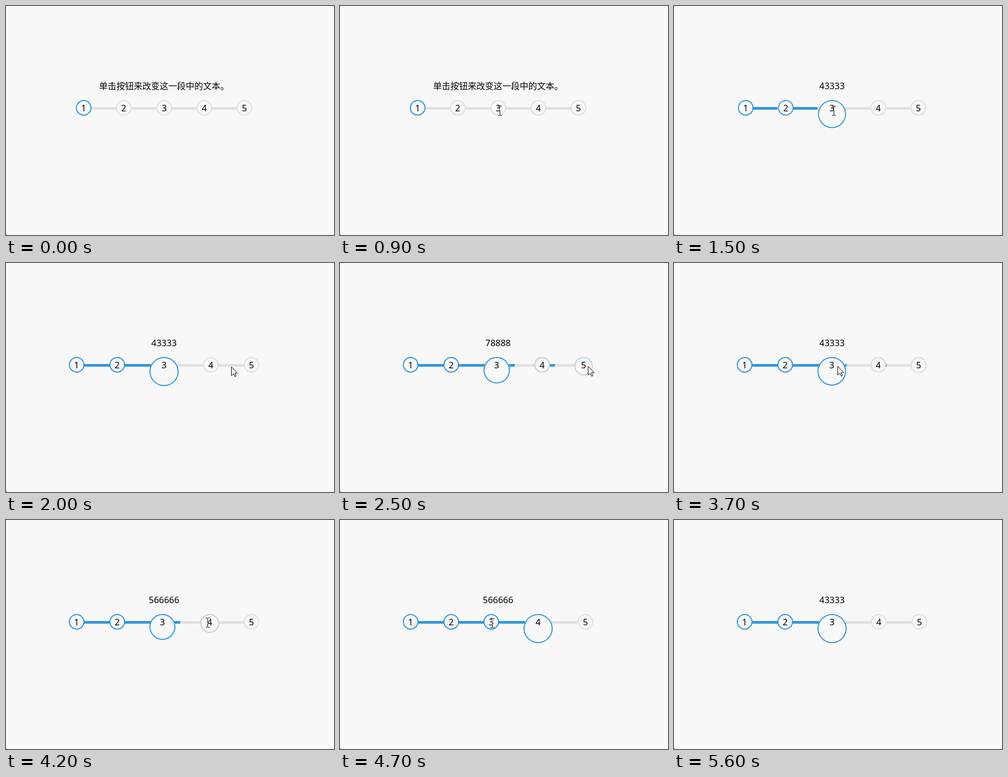
An HTML page that plays this animation: 606x424 px, repeating every 6.5 s.

```html
<!DOCTYPE html>
<html lang="zh-CN">
<head>
<meta charset="utf-8">
<title>步骤条</title>
<style>
html, body { margin: 0; width: 100%; height: 100%; overflow: hidden; background: #f8f8f8; }
svg { display: block; width: 606px; height: 424px; }
text { font: 300 16.4px "Noto Sans", "Open Sans", sans-serif; text-anchor: middle; fill: #000; }
#msg.cjk { font: 300 16px "Noto Sans CJK SC", "Noto Sans CJK", sans-serif; }
#beam { fill: none; stroke: #fff; mix-blend-mode: difference; }
</style>
</head>
<body>
<svg viewBox="0 0 606 424">
  <rect width="606" height="424" fill="#f8f8f8"/>
  <path d="M0 421.5V424H2.5Q.5 423.5 0 421.5Z" fill="#777"/>
  <text id="msg" x="292" y="154"></text>
  <g id="bars"></g>
  <g id="steps"></g>
  <path id="arrow" d="M.5.5V16.5L4.3 13 7 18.5 9.2 17.5 6.7 12H11.6Z" fill="#fff" stroke="#000"/>
  <path id="beam" d="M-3.5-8.5H-.5M.5-8.5H3.5M0-8V8M-3.5 8.5H-.5M.5 8.5H3.5"/>
</svg>
<script>
const LOOP = 6500, TICK = 100, FADE = 300;
const COUNT = 5, SMALL = 29, BIG = 54, GAP = 45.3, BAR = 50, MID = 292, TOP = 174;
const GREY = [224, 224, 224], BLUE = [52, 152, 219];

const messages = ['单击按钮来改变这一段中的文本。', '', '43333', '566666', '78888'];

const clicks = [
  { at: -FADE, step: 0 },
  { at: 1308, step: 2 },
  { at: 2451, step: 4 },
  { at: 3487, step: 2 },
  { at: 4150, step: 3 },
  { at: 4850, step: 2 }
];

// the pointer rests between moves
const ENTER = 200, LEAVE = 5500;
const moves = [
  { from: 200, to: 800, x: 295, y: 194 },
  { from: 1500, to: 2250, x: 458, y: 191 },
  { from: 2600, to: 3250, x: 281, y: 191 },
  { from: 3600, to: 3920, x: 372, y: 190 },
  { from: 4300, to: 4700, x: 281, y: 191 },
  { from: 5000, to: 5480, x: 600, y: 48 }
];

const $ = id => document.getElementById(id);
const mix = (a, b, k) => a + (b - a) * k;
const tint = k => `rgb(${GREY.map((c, i) => Math.round(mix(c, BLUE[i], k)))})`;
const smooth = p => {
  p = Math.min(1, Math.max(0, p));
  return p * p * (3 - 2 * p);
};

function set(el, attrs) {
  for (const k in attrs) el.setAttribute(k, attrs[k]);
}

function add(parent, tag, attrs) {
  const el = document.createElementNS('http://www.w3.org/2000/svg', tag);
  set(el, attrs);
  return $(parent).appendChild(el);
}

// cubic-bezier(.25, .1, .25, 1)
function ease(p) {
  if (p >= 1) return 1;
  const curve = (a, b, u) => 3 * a * u * (1 - u) ** 2 + 3 * b * u * u * (1 - u) + u ** 3;
  let lo = 0, hi = 1;
  for (let i = 0; i < 24; i++) {
    const mid = (lo + hi) / 2;
    if (curve(.25, .25, mid) < p) lo = mid; else hi = mid;
  }
  return curve(.1, 1, lo);
}

const steps = Array.from({ length: COUNT }, (_, i) => {
  const bar = fill => add('bars', 'rect', { y: 187, height: 5, width: i < COUNT - 1 ? BAR : 0, fill });
  const rail = bar(tint(0)), fill = bar(tint(1));
  const circle = add('steps', 'circle', { fill: '#f8f8f8', 'stroke-width': 2 });
  const label = add('steps', 'text', { y: 194.7 });
  label.textContent = i + 1;
  return { rail, fill, circle, label };
});

// returns the centres of the circles
function drawSteps(t) {
  const n = clicks.findLastIndex(c => c.at <= t);
  const now = clicks[n], old = clicks[Math.max(0, n - 1)];
  const k = ease((t - now.at) / FADE);
  const blend = test => mix(+test(old), +test(now), k);
  const sizes = steps.map((_, i) => mix(SMALL, BIG, blend(c => c.step > 0 && c.step === i)));
  let x = MID - sizes.reduce((a, b) => a + b, GAP * (COUNT - 1)) / 2;

  $('msg').textContent = messages[now.step];
  $('msg').setAttribute('class', now.step ? '' : 'cjk');

  return steps.map(({ rail, fill, circle, label }, i) => {
    const left = Math.round(x), d = Math.round(sizes[i]), cx = left + d / 2;
    const barX = left + d - 2;
    set(rail, { x: barX });
    set(fill, { x: barX, width: i < COUNT - 1 ? Math.round(BAR * blend(c => i < c.step)) : 0 });
    set(circle, { cx, cy: TOP + d / 2, r: d / 2 - 1, stroke: tint(blend(c => i <= c.step)) });
    set(label, { x: cx });
    x += sizes[i] + GAP;
    return cx;
  });
}

function drawPointer(t, centers) {
  let x = 600, y = 50;
  for (const m of moves) {
    const k = smooth((t - m.from) / (m.to - m.from));
    x = mix(x, m.x, k);
    y = mix(y, m.y, k);
  }
  x = Math.round(x);
  y = Math.round(y);
  const shown = t >= ENTER && t <= LEAVE;
  const onText = Math.abs(y - 189) < 11 && centers.some(c => Math.abs(c - x) < 5.5);
  const show = on => shown && on ? 'visible' : 'hidden';
  set($('arrow'), { transform: `translate(${x} ${y})`, visibility: show(!onText) });
  set($('beam'), { transform: `translate(${x + .5} ${y})`, visibility: show(onText) });
}

function draw(ms) {
  const t = Math.floor(ms % LOOP / TICK) * TICK;
  drawPointer(t, drawSteps(t));
}

let start;
function frame(now) {
  start ??= now;
  draw(now - start);
  requestAnimationFrame(frame);
}
draw(0);
requestAnimationFrame(frame);
</script>
</body>
</html>
```
